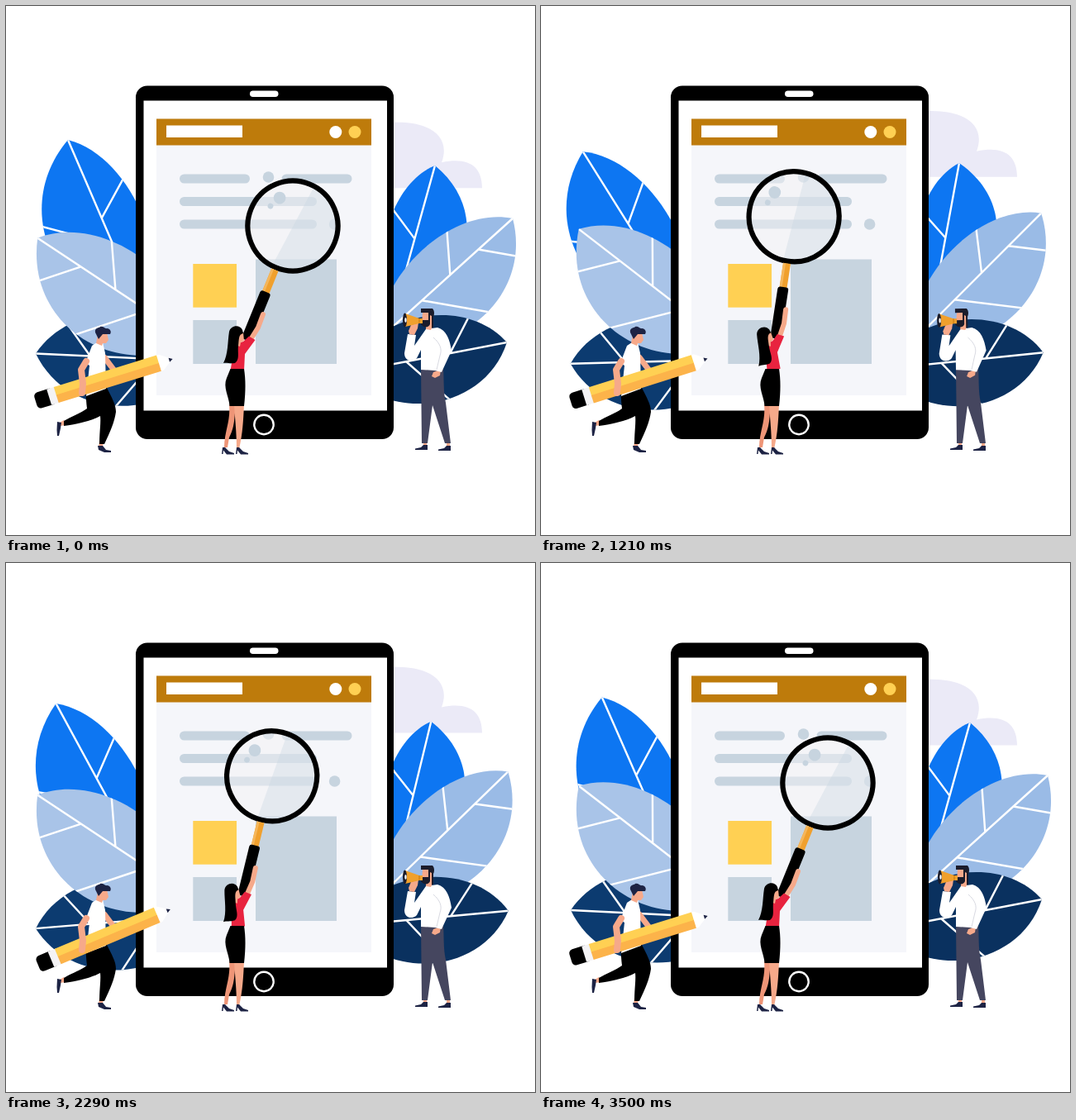
These frames come from a looping animation (640 px wide and 640 px high, 3570 ms). An HTML page:

```html
<!DOCTYPE html>
<html lang="en">
<head>
<meta charset="utf-8">
<title>Page search</title>
<style>
html, body { margin: 0; width: 100%; height: 100%; overflow: hidden; background: #fff; }
svg { display: block; width: 100%; height: 100%; }
.vein { fill: none; stroke: #fff; stroke-width: 2.4; }
.skin { fill: #f6a98a; }
.limb { fill: none; stroke: #f6a98a; stroke-linecap: round; stroke-linejoin: round; }
.navy { fill: #1d2344; }
.grey { fill: #c7d4df; }
.bar { fill: none; stroke: #c7d4df; stroke-width: 11; stroke-linecap: round; }
.gold { fill: #ffd053; }
.white { fill: #fff; }
</style>
</head>
<body>
<svg viewBox="0 0 640 640">
  <path id="cloud" fill="#ebeaf7" d="M455 221V142Q470 141 479 141.500C516 143 538 161 527 190C560 183 576 195 576 221Z"/>
  <g id="leaves"></g>

  <!-- tablet -->
  <rect x="157" y="96.500" width="312" height="427.500" rx="14"/>
  <rect class="white" x="166.500" y="114.500" width="294.500" height="375"/>
  <rect class="white" x="295" y="102.500" width="34.500" height="7.500" rx="3.750"/>
  <circle cx="312" cy="506.500" r="11.700" fill="none" stroke="#fff" stroke-width="2.400"/>
  <rect x="182" y="136.500" width="260" height="334.500" fill="#f5f6fa"/>
  <rect x="182" y="136.500" width="260" height="32" fill="#be7b0b"/>
  <rect class="white" x="194" y="144.500" width="92" height="14.500"/>
  <circle class="white" cx="398.800" cy="152.500" r="7.500"/>
  <circle class="gold" cx="422" cy="152.500" r="7.500"/>
  <path class="bar" d="M215.500 209H289.500M339 209H413M215.500 236.500H370.500M215.500 264H370.500"/>
  <g class="grey">
    <circle cx="317.500" cy="207" r="6.800"/>
    <circle cx="397.600" cy="264" r="6.800"/>
    <rect x="226.300" y="380" width="52.700" height="53"/>
    <rect x="302" y="306.500" width="98" height="126.500"/>
  </g>
  <rect class="gold" x="226.300" y="312" width="52.700" height="52.700"/>

  <!-- woman -->
  <path d="M270 482L278 482C276 500 277 508 270 522L268 534H264C264 515 272 502 270 482Z" fill="#ee9577"/>
  <path class="skin" d="M276 482H288C287 505 286 518 282 536H279C279 515 277 500 276 482Z"/>
  <path id="heel" class="navy" d="M262 534L265 534L270 539L276 541V542.500H267L263 537.500L262.500 542H261Z"/>
  <use href="#heel" x="17"/>
  <g id="reach">
    <g transform="rotate(22.150 279 433)">
      <circle cx="279" cy="252.700" r="54" fill="#f3f4f5" fill-opacity=".5"/>
      <path class="grey" d="M285 199A54 54 0 0 1 274 306.500Z" fill-opacity=".35"/>
      <circle class="grey" cx="251.500" cy="227.300" r="7.400"/>
      <circle class="grey" cx="245" cy="240.700" r="3.400"/>
      <circle cx="279" cy="252.700" r="54.500" fill="none" stroke="#000" stroke-width="6.200"/>
      <rect x="274.500" y="310" width="9" height="32" fill="#f0a02d"/>
      <rect x="274.500" y="310" width="3" height="32" fill="#f5b65b"/>
      <rect x="272.500" y="339" width="13" height="63" rx="3"/>
    </g>
    <path class="limb" stroke-width="6" d="M295 405L305 389L311 373"/>
    <path fill="#e8233f" d="M280 408L287 406L294 399.500L301.500 404L289 421L288 441H271.500L275 420Z"/>
    <path class="skin" d="M280 394L287 395L288 405L284 407L283 412L278 410Z"/>
    <path d="M270 394C272 386 283 385 286 392L287 396C281 397 282 404 281 411C280 420 283 428 277 432C271 433 267 431 263 432C269 421 268 406 270 394Z"/>
  </g>
  <path d="M271.500 439H288C290 452 290 466 288 484H270.500C270 473 262 461 267 450Z"/>

  <!-- man with pencil -->
  <path class="skin" d="M113 526H118L117 533H112ZM70 501L73 507L65 508V504Z"/>
  <path d="M96 466L122 462C128 474 133 482 133 491C131 505 125 517 119 530H113C113 515 115 504 114 496C103 502 85 506 70 508V502C80 496 90 493 98 487C97 480 97 473 96 466Z"/>
  <path class="navy" d="M111 532L117 532L121 537L127 538V540H119L112 537ZM62 503L67 504L66 511L64 520H62L61.500 513Z"/>
  <path class="limb" stroke-width="7" d="M119 425L131 441"/>
  <path class="white" d="M96 432L104 411L110 407L117 407L120 420L121 463L97 472L101 435Z"/>
  <path class="skin" d="M111 398L122 395L124 404L121 408L117 408L116 411L109 408Z"/>
  <path class="navy" d="M108 395C107 389 112 390 114 388C118 387 120 391 122 390C126 390 128 394 126 397L117 397L112 403Z"/>
  <g id="pencil">
    <g transform="translate(119 452.500) rotate(-17.200)">
      <path class="white" d="M66 -10L72 -10L86 0L72 10L66 10Z"/>
      <path class="navy" d="M82 -2.500L86.500 0L82 2.500Z"/>
      <rect x="-87" y="-10" width="24" height="20" rx="5"/>
      <rect x="-70" y="-10" width="10" height="20" fill="#f4f3f5"/>
      <rect class="gold" x="-61" y="-10" width="130" height="11"/>
      <rect x="-61" y="0" width="130" height="10" fill="#fcb34a"/>
    </g>
  </g>
  <path class="limb" stroke-width="8" d="M97 430L91 440L93 457L92 468"/>

  <!-- man with megaphone -->
  <path class="skin" d="M505 526H509V533H505ZM533 526H537V533H533Z"/>
  <path id="shoe" class="navy" d="M505 531L510 531V537H495V535.500L502 534Z"/>
  <use href="#shoe" x="28" y="1"/>
  <path fill="#45465f" d="M502 437H529C530 453 529 466 532 480L538 529H531L516 483L510 529H503Z"/>
  <g id="caller">
    <path class="skin" d="M517 443L526 440L525 447L519 450L515 448Z"/>
    <path class="white" d="M486 397L496 398L494 411L508 391L522 389C533 392 537 404 539 417L527 443L519 441L502 440V416L497 426C491 432 482 429 482 420Z"/>
    <path d="M517 401C525 408 528 415 525 423L521 440" fill="none" stroke="#cfd0da" stroke-width=".800"/>
    <path class="skin" d="M504 371H516V388L514 392L508 391V386L503 384Z"/>
    <path fill="#1b1c2b" d="M502 366L516 366C519 369 518 374 517 376V389H515V375L513 374V385C511 390 505 389 502 385V380L511 380V371H502Z"/>
    <path class="skin" d="M487 393L490 386L499 383L498 390L494 398L488 397Z"/>
    <path fill="#f0a02d" d="M483 372L500 378H504V384H500L483 388Z"/>
    <path fill="#d98a1c" d="M499 378H501V384H499Z"/>
    <ellipse cx="482.500" cy="380" rx="2.500" ry="8.500" fill="#1b1c2b"/>
    <ellipse cx="483.500" cy="380" rx="1.200" ry="3" class="white"/>
  </g>
</svg>
<script>
const LOOP = 3570, FRAMES = 50, VEIN_ANGLE = 52 * Math.PI / 180;
const byId = id => document.getElementById(id);

// Half linear, half cosine ease from 0 to 1.
function ease(u) {
  u = Math.min(1, Math.max(0, u));
  return u / 2 + (1 - Math.cos(Math.PI * u)) / 4;
}

// Turns out to `angle` between a and b, rests, and turns back between c and d.
const swing = (angle, a, b, c, d) =>
  t => angle * (ease((t - a) / (b - a)) - ease((t - c) / (d - c)));

const moves = [];
function pivot(id, x, y, angle) {
  const node = byId(id);
  moves.push(t => node.setAttribute('transform', `rotate(${angle(t)} ${x} ${y})`));
}

// A leaf lies along its midrib, tip at the origin; veins branch off to side +1 or -1.
function leaf(id, fill, [x, y, turn, length, right, left], veins) {
  const side = h => `C${length * .2} ${h} ${length * .75} ${h} ${length} 0`;
  const back = `C${length * .75} ${-left} ${length * .2} ${-left} 0 0`;
  const shape = `<path d="M0 0${side(right)}${back}Z"/>`;
  const branch = s => {
    const start = Math.abs(s), dx = 120 * Math.cos(VEIN_ANGLE), dy = 120 * Math.sin(VEIN_ANGLE);
    return `M${start} 0l${-dx} ${Math.sign(s) * dy}`;
  };
  byId('leaves').insertAdjacentHTML('beforeend', `
    <g id="${id}"><g transform="translate(${x} ${y}) rotate(${turn})" fill="${fill}">
      <clipPath id="${id}Edge">${shape}</clipPath>${shape}
      <path class="vein" clip-path="url(#${id}Edge)" d="M0 0H${length}${veins.map(branch).join('')}"/>
    </g></g>`);
}

leaf('leftBlue', '#0d76f2', [75, 162, 66.7, 240, 97, 62], [-103, 139]);
leaf('leftDark', '#0c3b70', [36, 420, 2.8, 210, 78, 70], [-66, 146]);
leaf('leftLight', '#a9c4e8', [38, 281, 33.4, 230, 95, 66], [63, -113, 159]);
leaf('rightBlue', '#0d76f2', [519, 193, 105.5, 180, 47, 81], [92]);
leaf('rightLight', '#9abbe6', [613, 257, 137.9, 220, 60, 85], [-56, 102, -148]);
leaf('rightDark', '#0a315f', [606, 407, 169.2, 200, 66, 73], [70, -124]);

pivot('leftBlue', 155, 327, swing(-8.8, 0, 1050, 1210, 3700));
pivot('leftDark', 205, 431, swing(-7.5, -100, 2250, 2300, 3500));
pivot('leftLight', 190, 378, t => 4.6 * Math.sin(Math.PI * (t + 120) / 2300) ** 2);
pivot('rightBlue', 479, 338, swing(-5.2, 0, 700, 1150, 3000));
pivot('rightLight', 484, 408, swing(-3.2, 0, 1400, 1600, 3400));
pivot('rightDark', 465, 433, swing(6.1, 0, 1600, 2100, 3500));
pivot('reach', 279, 433, swing(-13.5, 0, 1100, 1640, 3250));
pivot('pencil', 119, 452.5, swing(-5.5, 1150, 1800, 2400, 3450));
pivot('caller', 516, 440, swing(-5, 0, 570, 570, 1400));

// The cloud bobs twice per loop.
const cloud = byId('cloud');
moves.push(t => {
  const y = -11.5 - 11 * Math.cos(4 * Math.PI * (t - 840) / LOOP);
  cloud.setAttribute('transform', `translate(0 ${y})`);
});

function draw(now) {
  const step = LOOP / FRAMES;
  const t = Math.floor((now % LOOP + 5) / step) % FRAMES * step;
  moves.forEach(move => move(t));
  requestAnimationFrame(draw);
}
draw(performance.now());
</script>
</body>
</html>
```
